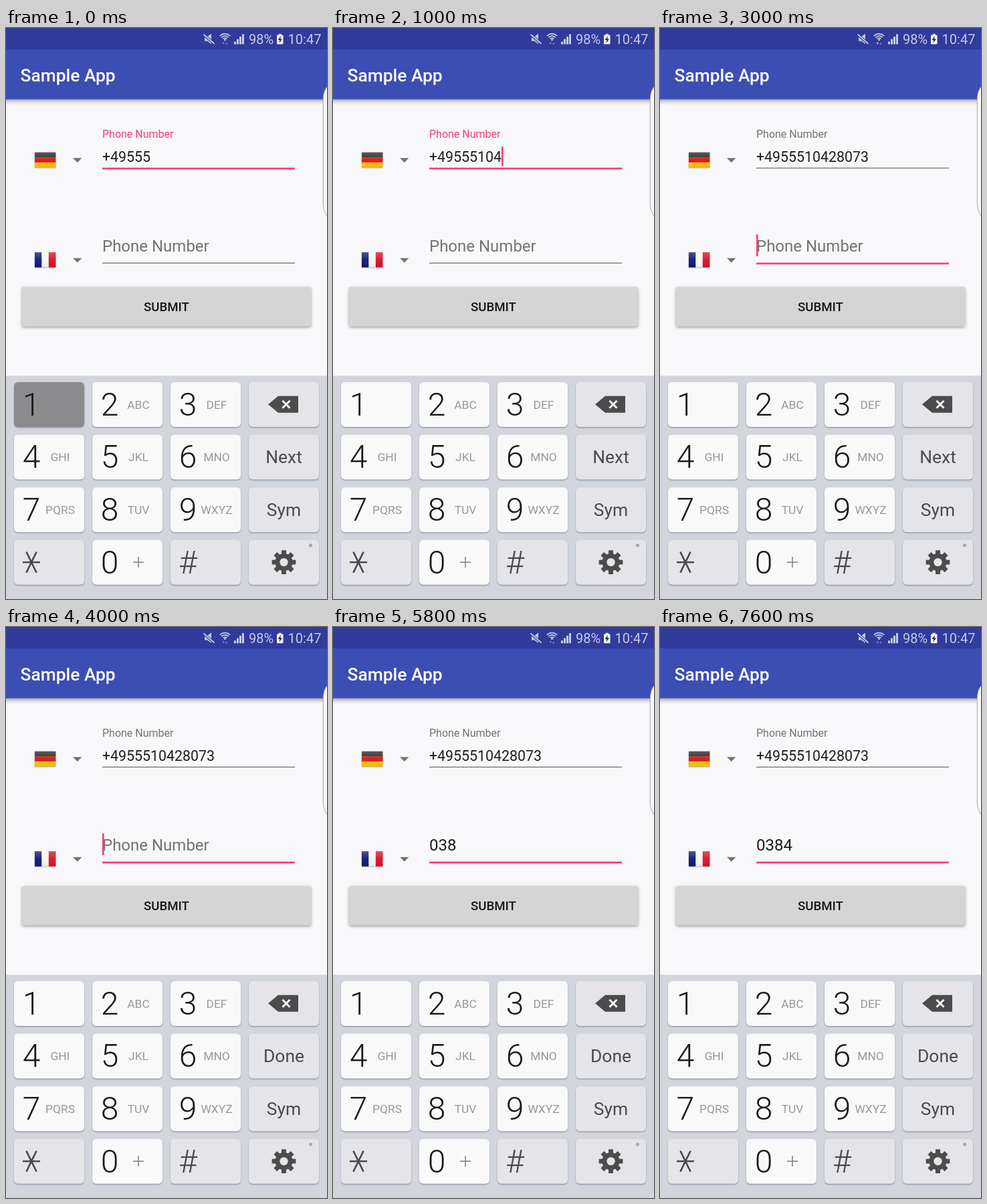
These frames come from a looping animation (480 by 853 pixels, 8000 ms). An HTML page with a canvas:

```html
<!DOCTYPE html>
<html lang="en">
<head>
<meta charset="utf-8">
<title>Phone number form</title>
<style>
html, body { margin: 0; width: 100%; height: 100%; overflow: hidden; background: #f8f7fa; }
canvas { display: block; width: 480px; height: 853px; }
</style>
</head>
<body>
<canvas id="stage"></canvas>
<script>
const LOOP = 8000;
const PINK = '#f83c7c';
const INK = '#1e1e1e';
const GREY = '#737373';
const PALE = '#c7cae8';
const SYMBOL = '#484848';
const FIRST = '+4955510428073';
const SECOND = '0384';

// [start ms, characters in first field, in second field, pressed key, cursor shown]
const STEPS = [
  [0, 6, 0, '1', 0], [200, 7, 0, '', 1], [400, 7, 0, '2', 1],
  [600, 8, 0, '', 1], [800, 8, 0, '3', 1], [1000, 9, 0, '', 1],
  [1200, 9, 0, '', 0], [1600, 10, 0, '5', 1], [1800, 11, 0, '6', 1],
  [2000, 12, 0, '7', 1], [2200, 13, 0, '8', 1], [2400, 14, 0, '', 1],
  [3000, 14, 0, '', 1], [3400, 14, 0, '', 0], [4000, 14, 0, '', 1],
  [4600, 14, 0, '0', 0], [4800, 14, 1, '6', 1], [5000, 14, 2, '9', 1],
  [5200, 14, 3, '', 1], [5800, 14, 3, '', 0], [6400, 14, 3, '', 1],
  [6800, 14, 3, '', 0], [7000, 14, 3, '5', 0], [7200, 14, 4, '', 1],
  [7600, 14, 4, '', 0]
];
const FOCUS_MOVES = 3000;
const ACTION_CHANGES = 3200;

const KEYS = [
  ['1', '2', '3', 'back'],
  ['4', '5', '6', 'action'],
  ['7', '8', '9', 'Sym'],
  ['*', '0', '#', 'gear']
];
const LETTERS = { 2: 'ABC', 3: 'DEF', 4: 'GHI', 5: 'JKL', 6: 'MNO', 7: 'PQRS', 8: 'TUV', 9: 'WXYZ' };

const canvas = document.getElementById('stage');
const ctx = canvas.getContext('2d');
const ratio = window.devicePixelRatio || 1;
canvas.width = Math.round(480 * ratio);
canvas.height = Math.round(853 * ratio);
ctx.scale(ratio, ratio);

function rect(x, y, w, h, fill) {
  ctx.fillStyle = fill;
  ctx.fillRect(x, y, w, h);
}

function round(x, y, w, h, r, fill) {
  ctx.fillStyle = fill;
  ctx.beginPath();
  ctx.roundRect(x, y, w, h, r);
  ctx.fill();
}

function text(str, x, y, size, color, weight = 400, align = 'left') {
  ctx.font = `${weight} ${size}px Roboto, sans-serif`;
  ctx.textAlign = align;
  ctx.fillStyle = color;
  ctx.fillText(str, x, y);
}

function poly(points, fill) {
  ctx.fillStyle = fill;
  ctx.beginPath();
  points.forEach(([x, y]) => ctx.lineTo(x, y));
  ctx.closePath();
  ctx.fill();
}

function line(x1, y1, x2, y2, color, width) {
  ctx.strokeStyle = color;
  ctx.lineWidth = width;
  ctx.beginPath();
  ctx.moveTo(x1, y1);
  ctx.lineTo(x2, y2);
  ctx.stroke();
}

function disc(x, y, r, fill) {
  ctx.fillStyle = fill;
  ctx.beginPath();
  ctx.arc(x, y, r, 0, Math.PI * 2);
  ctx.fill();
}

function fade(x1, y1, x2, y2, ...colors) {
  const g = ctx.createLinearGradient(x1, y1, x2, y2);
  colors.forEach((c, i) => g.addColorStop(i / (colors.length - 1), c));
  return g;
}

function withShadow(color, blur, dy, draw) {
  ctx.save();
  ctx.shadowColor = color;
  ctx.shadowBlur = blur * ratio;
  ctx.shadowOffsetY = dy * ratio;
  draw();
  ctx.restore();
}

function statusBar(busy) {
  rect(0, 0, 480, 32, '#303b9b');

  // muted speaker
  poly([[297, 13], [301, 13], [307, 8.5], [307, 24], [301, 19.5], [297, 19.5]], PALE);
  line(295, 9.5, 311.5, 23.5, '#303b9b', 4);
  line(295.5, 9.5, 311.5, 23.5, PALE, 1.7);

  // wireless arcs with traffic arrows
  ctx.strokeStyle = PALE;
  ctx.lineWidth = 1.7;
  for (const r of [4, 7.2, 10.4]) {
    ctx.beginPath();
    ctx.arc(327.5, 19, r, -Math.PI * 0.76, -Math.PI * 0.24);
    ctx.stroke();
  }
  disc(327.5, 17.6, 1.5, PALE);
  poly([[323.5, 21.5], [327, 21.5], [325.2, 24.5]], busy ? PALE : '#7f86c4');
  poly([[328, 24.5], [331.5, 24.5], [329.8, 21.5]], '#7f86c4');

  // signal bars
  for (let i = 0; i < 4; i++) {
    const h = 4 + i * 3.7;
    rect(341 + i * 4, 24.3 - h, 3, h, PALE);
  }

  text('98%', 363, 24, 20, PALE);
  round(405, 10.5, 9.5, 13.8, 1, '#f2f3fb');
  rect(407.6, 8.8, 4.3, 2, '#f2f3fb');
  poly([[411, 12], [406.6, 18], [409.4, 18], [408.4, 22.6], [413, 16.4], [410.2, 16.4]], '#20242e');
  text('10:47', 421.6, 24, 20, PALE);
}

function toolbar() {
  withShadow('rgba(0,0,0,.42)', 7, 2.5, () => rect(-10, 32, 500, 74.5, '#3c4eb3'));
  text('Sample App', 21.5, 79.5, 26.4, '#fff', 500);
}

function edgeHandle() {
  ctx.beginPath();
  ctx.moveTo(482, 86);
  ctx.bezierCurveTo(477, 90, 474.3, 98, 474.3, 108);
  ctx.lineTo(474.3, 260);
  ctx.bezierCurveTo(474.3, 270, 477, 278, 482, 282);
  ctx.fillStyle = '#f8f8fa';
  ctx.fill();
  ctx.strokeStyle = '#a5a5aa';
  ctx.lineWidth = 1;
  ctx.stroke();
}

function flag(y, colors, upright) {
  withShadow('rgba(0,0,0,.35)', 2, 0.7, () => rect(43, y, 31.3, 22.6, '#aaa'));
  colors.forEach((c, i) => {
    if (upright) rect(43 + i * 10.43, y, 10.45, 22.6, c);
    else rect(43, y + i * 7.53, 31.3, 7.55, c);
  });
  rect(43, y, 31.3, 22.6, fade(0, y, 0, y + 22.6,
    'rgba(255,255,255,.25)', 'rgba(255,255,255,.04)', 'rgba(0,0,0,.06)'));
}

function dropArrow(y) {
  poly([[100, y], [113.4, y], [106.7, y + 6.8]], GREY);
}

function underline(y, focused) {
  if (focused) rect(144, y, 288, 2.7, PINK);
  else rect(144, y, 288, 1.4, '#7b7b7d');
}

function cursor(str, size, y, h) {
  ctx.font = `400 ${size}px Roboto, sans-serif`;
  rect(144 + ctx.measureText(str).width, y, 2.6, h, PINK);
}

function form(first, second, onFirst, blink) {
  flag(185.8, ['#262626', '#d9160f', '#fbc40a'], false);
  flag(335, ['#101a78', '#f7f7f7', '#d8142a'], true);
  dropArrow(194.3);
  dropArrow(343.8);

  text('Phone Number', 144, 164.3, 16, onFirst ? PINK : GREY);
  text(first, 144, 200.3, 21.33, INK);
  underline(208.6, onFirst);

  if (second) text(second, 144, 334.3, 24, INK);
  else text('Phone Number', 144, 334.3, 24, GREY);
  underline(350.5, !onFirst);

  if (blink && onFirst) cursor(first, 21.33, 177.3, 29);
  if (blink && !onFirst) cursor(second, 24, 308.3, 32.7);

  withShadow('rgba(0,0,0,.38)', 4, 1.5, () => round(24, 387, 432, 58.7, 2.6, '#d5d5d5'));
  text('SUBMIT', 240, 423.3, 18.67, '#171717', 500, 'center');
}

function backspace(x, y) {
  poly([[x - 23.5, y], [x - 8.5, y - 12.5], [x + 21.5, y - 12.5],
    [x + 21.5, y + 12.5], [x - 8.5, y + 12.5]], '#4c4c4c');
  line(x - 2, y - 5.5, x + 9, y + 5.5, '#f2f2f4', 3);
  line(x - 2, y + 5.5, x + 9, y - 5.5, '#f2f2f4', 3);
}

function gear(x, y, hole) {
  const points = [];
  for (let i = 0; i < 8; i++) {
    const mid = i * Math.PI / 4;
    for (const [turn, r] of [[-0.27, 13.2], [-0.19, 18.2], [0.19, 18.2], [0.27, 13.2]]) {
      points.push([x + r * Math.cos(mid + turn), y + r * Math.sin(mid + turn)]);
    }
  }
  poly(points, '#4c4c4c');
  disc(x, y, 6.2, hole);
  disc(x + 40, y - 25.3, 2.6, '#a9a9ae');
}

function asterisk(x, y) {
  line(x - 13, y, x + 13, y, SYMBOL, 2.5);
  line(x - 7.6, y - 15.5, x + 7.6, y + 15.5, SYMBOL, 2.5);
  line(x + 7.6, y - 15.5, x - 7.6, y + 15.5, SYMBOL, 2.5);
}

function key(name, x, y, pressed, action) {
  const digit = /\d/.test(name);
  const fill = pressed ? '#8b8a8c' : digit ? '#f9f9f9' : '#e5e5e9';
  withShadow('rgba(70,75,90,.5)', 2, 1.2, () => round(x, y, 105, 67, 6, fill));

  const cy = y + 33.3;
  if (digit) {
    text(name, x + 26, y + 49.8, 48, '#1a1a1a', 300, 'center');
    const small = pressed ? '#505050' : '#98989a';
    if (LETTERS[name]) text(LETTERS[name], x + 69, y + 39.7, 17.4, small, 400, 'center');
    if (name === '0') {
      line(x + 61, cy, x + 77, cy, '#8a8a8c', 1.7);
      line(x + 69, cy - 8, x + 69, cy + 8, '#8a8a8c', 1.7);
    }
  } else if (name === '*') asterisk(x + 26, cy);
  else if (name === '#') text('#', x + 26, y + 49.8, 48, SYMBOL, 300, 'center');
  else if (name === 'back') backspace(x + 52.5, cy);
  else if (name === 'gear') gear(x + 52.5, cy, fill);
  else text(name === 'action' ? action : name, x + 52.5, y + 42.8, 26.4, '#4a4a4a', 400, 'center');
}

function keyboard(pressed, action) {
  rect(0, 519.5, 480, 334, '#d2d5dc');
  KEYS.forEach((row, r) => row.forEach((name, c) =>
    key(name, 12 + c * 117, 529 + r * 78.6, name === pressed, action)));
}

function draw(now) {
  const t = now % LOOP;
  const [, n1, n2, pressed, blink] = STEPS.findLast(step => step[0] <= t);
  rect(0, 0, 480, 853, '#f8f7fa');
  toolbar();
  statusBar(t >= FOCUS_MOVES && t < 4000);
  form(FIRST.slice(0, n1), SECOND.slice(0, n2), t < FOCUS_MOVES, blink);
  edgeHandle();
  keyboard(pressed, t < ACTION_CHANGES ? 'Next' : 'Done');
}

const start = performance.now();
function tick() {
  draw(performance.now() - start);
  requestAnimationFrame(tick);
}
tick();
</script>
</body>
</html>
```
